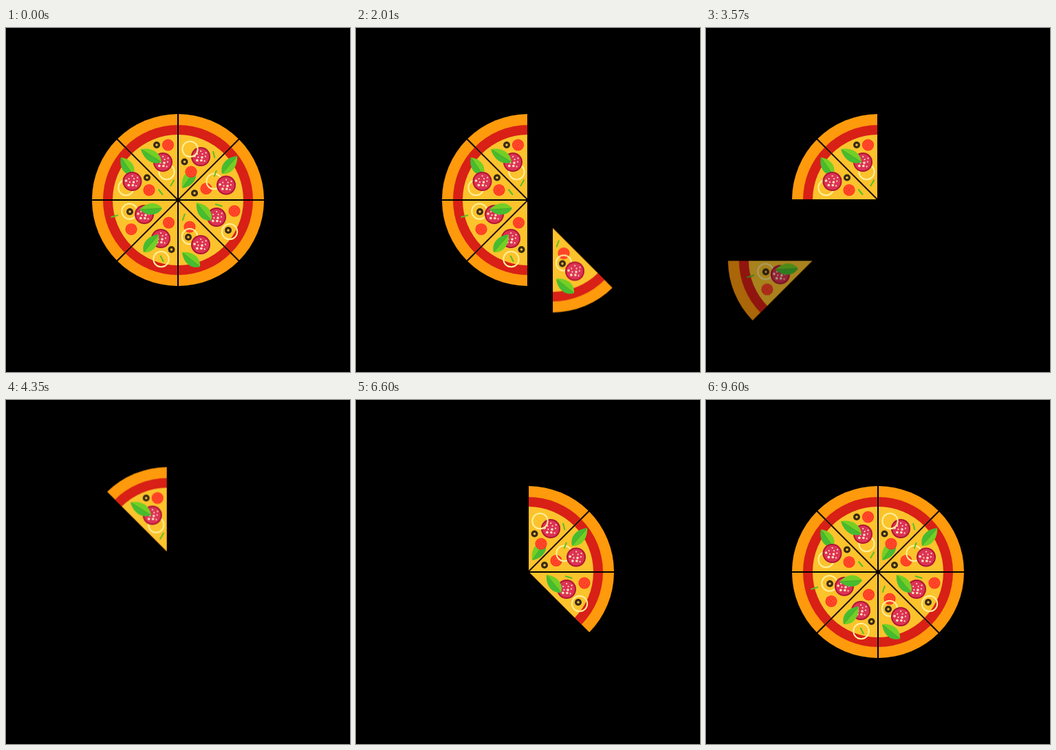
These frames come from a looping animation (500 px wide and 500 px high, 9930 ms). An HTML page with a canvas:

```html
<!DOCTYPE html>
<html lang="en">
<head>
<meta charset="utf-8">
<title>Pizza slices</title>
<style>
html, body { margin: 0; height: 100%; overflow: hidden; background: #000; }
canvas { display: block; width: 500px; height: 500px; }
</style>
</head>
<body>
<canvas id="stage" width="500" height="500"></canvas>
<script>
const SIZE = 500, MID = 250, STEP = 600, FADE = 180, LOOP = 9930, TICK = 30;
const stage = document.getElementById('stage').getContext('2d');
let g; // context that the drawing helpers paint on

function disc(x, y, r, color) {
  g.fillStyle = color;
  g.beginPath();
  g.arc(x, y, r, 0, Math.PI * 2);
  g.fill();
}

function ring(x, y, r, color, width) {
  g.strokeStyle = color;
  g.lineWidth = width;
  g.beginPath();
  g.arc(x, y, r, 0, Math.PI * 2);
  g.stroke();
}

const onion = (x, y) => ring(x, y, 11.2, '#fff09a', 2);

function olive(x, y) {
  disc(x, y, 5, '#382a16');
  disc(x, y, 1.8, '#f5c13a');
}

function pepperoni(x, y) {
  disc(x, y, 14, '#b01535');
  disc(x, y, 12, '#dc3355');
  for (let i = 0; i < 11; i++) {
    const a = i * 2.4 + 0.5, r = 2.9 * Math.sqrt(i + 0.6);
    disc(x + r * Math.cos(a), y + r * Math.sin(a), i % 3 ? 1.1 : 1.8, '#ffe3bd');
  }
}

function tomato(x, y) {
  disc(x, y, 8.6, '#ff3d22');
  g.setLineDash([1.5, 1.5]);
  ring(x, y, 5.8, '#ff7a4c', 0.9);
  ring(x, y, 2.8, '#ff7a4c', 0.9);
  g.setLineDash([]);
}

function stick(x1, y1, x2, y2) {
  g.strokeStyle = '#58c026';
  g.lineWidth = 2;
  g.beginPath();
  g.moveTo(x1, y1);
  g.lineTo(x2, y2);
  g.stroke();
}

// A leaf from its pointed tip to its rounder base, in two shades.
function leaf(x1, y1, x2, y2) {
  const length = Math.hypot(x2 - x1, y2 - y1);
  g.save();
  g.translate(x1, y1);
  g.rotate(Math.atan2(y2 - y1, x2 - x1));
  for (const [side, color] of [[-1, '#74cf24'], [1, '#46bc30']]) {
    g.fillStyle = color;
    g.beginPath();
    g.moveTo(0, 0);
    g.bezierCurveTo(length * 0.3, side * 10, length * 0.75, side * 12, length, 0);
    g.fill();
  }
  g.strokeStyle = '#3da82a';
  g.lineWidth = 0.8;
  g.beginPath();
  g.moveTo(2, 0);
  g.lineTo(length - 1, 0);
  g.stroke();
  g.restore();
}

// Clockwise from the top: how far each slice flies and what lies on it.
const slices = [
  { dx: 46, dy: -114, toppings() {
    leaf(256, 233, 275, 206); tomato(269, 209); pepperoni(283, 187);
    onion(267.5, 176); olive(259.5, 194.5); stick(301, 179, 303.5, 189);
  } },
  { dx: 111, dy: -70, toppings() {
    tomato(291, 233.5); onion(302.5, 223); pepperoni(320, 228.5);
    olive(274, 240); leaf(336, 186, 314, 212); stick(306, 207, 302.5, 216);
  } },
  { dx: 119, dy: 39, toppings() {
    pepperoni(306, 275); leaf(277, 254, 298, 280); tomato(332, 266);
    onion(325, 296); olive(323, 294); stick(304, 256, 314.5, 259);
  } },
  { dx: 100, dy: 110, toppings() {
    tomato(267, 289); onion(267, 303); olive(265, 304);
    pepperoni(283, 315); leaf(256, 326, 282, 347); stick(260, 270, 256.5, 280);
  } },
  { dx: -3, dy: 118, toppings() {
    tomato(236.5, 283); pepperoni(225, 306); leaf(222, 300, 200, 326);
    olive(240.5, 322); onion(225.5, 336); stick(224.5, 331, 229, 340);
  } },
  { dx: -98, dy: 92, toppings() {
    onion(179.5, 266.5); olive(180, 267); pepperoni(201, 271);
    leaf(194, 264, 227, 262); tomato(182, 292.5); stick(152.5, 275, 163, 272);
  } },
  { dx: -116, dy: -42, toppings() {
    onion(174.5, 232); leaf(167, 188, 185, 214); pepperoni(183.5, 223);
    olive(205, 217.5); tomato(208, 235.5); stick(221.5, 234.5, 228, 242.5);
  } },
  { dx: -61, dy: -110, toppings() {
    onion(233.5, 209); pepperoni(228, 195); leaf(196, 176, 226, 195);
    olive(219, 170); tomato(235.5, 170); stick(244.5, 220.5, 239, 230);
  } }
];

// Paint every slice once on its own layer so that it can fade as a whole.
slices.forEach((slice, i) => {
  slice.layer = document.createElement('canvas');
  slice.layer.width = slice.layer.height = SIZE;
  g = slice.layer.getContext('2d');
  const start = (i - 2) * Math.PI / 4, middle = start + Math.PI / 8;
  g.translate(2.8 * Math.cos(middle), 2.8 * Math.sin(middle));
  g.beginPath();
  g.moveTo(MID, MID);
  g.arc(MID, MID, 140, start, start + Math.PI / 4);
  g.clip();
  g.setTransform(1, 0, 0, 1, 0, 0);
  disc(MID, MID, 125, '#ff9a0c');
  disc(MID, MID, 109, '#d82016');
  disc(MID, MID, 95, '#fcc32c');
  slice.toppings();
});

const clamp = v => Math.min(1, Math.max(0, v));

function draw(now) {
  const t = Math.floor(now % LOOP / TICK) * TICK;
  stage.globalAlpha = 1;
  stage.fillStyle = '#000';
  stage.fillRect(0, 0, SIZE, SIZE);
  slices.forEach(({ dx, dy, layer }, i) => {
    const out = t - i * STEP, back = out - slices.length * STEP;
    const away = back < 0 ? clamp(out / STEP) : 1 - clamp(back / STEP);
    stage.globalAlpha = back < 0 ? clamp((STEP + FADE / 2 - out) / FADE) : clamp(back / FADE);
    stage.drawImage(layer, dx * away, dy * away);
  });
}

const begin = performance.now();
function loop() {
  draw(performance.now() - begin);
  requestAnimationFrame(loop);
}
loop();
</script>
</body>
</html>
```
